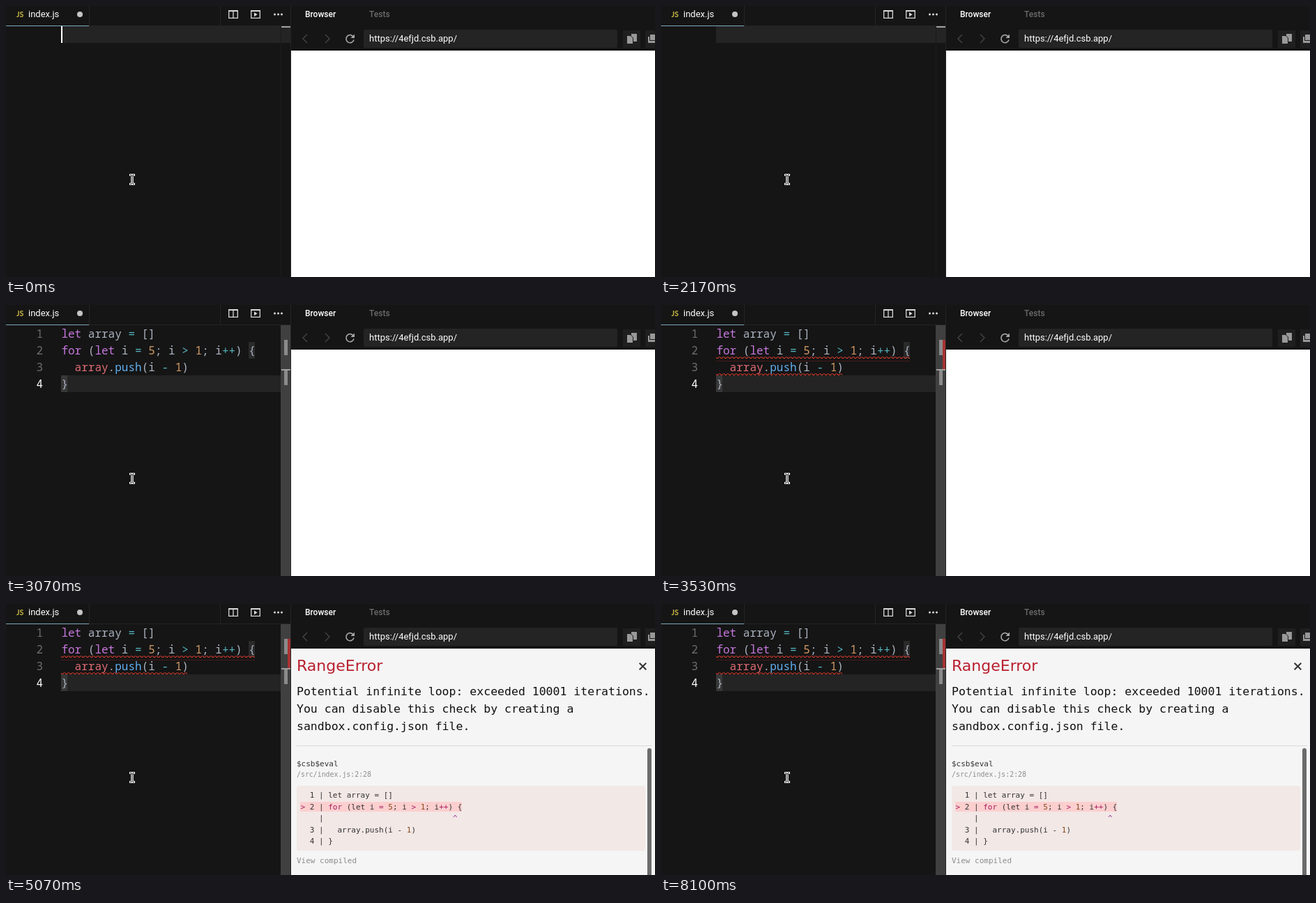
These frames come from a looping animation (931 px wide and 389 px high, 8230 ms). An HTML page:

```html
<!DOCTYPE html>
<html lang="en">
<head>
<meta charset="utf-8">
<title>Infinite loop check</title>
<style>
html, body { margin: 0; width: 100%; height: 100%; overflow: hidden; background: #151515; }
svg { display: block; }
text { white-space: pre; font-family: Roboto, sans-serif; }
.code text { font: 16px "Noto Sans Mono", monospace; fill: #abb2bf; }
.code .kw { fill: #c678dd; }
.code .op { fill: #56b6c2; }
.code .num { fill: #d19a66; }
.code .name { fill: #e06c75; }
.code .fn { fill: #61afef; }
.code .line { fill: #6d6d6d; }
.code .active { fill: #fff; }
.report text { font: 11px "DejaVu Sans Mono", monospace; fill: #333; }
.report .title { font: 22px "DejaVu Sans", sans-serif; fill: #b9202f; }
.report .message { font-size: 16.5px; fill: #111; }
.report .path { font-size: 9.9px; fill: #8c8c8c; }
.report .link { fill: #8c8c8c; }
.report .mark { fill: #a71d5d; }
.report .caret { fill: #a0309a; }
.report .num { fill: #8a4b1c; }
</style>
</head>
<body>
<svg width="931" height="389" viewBox="0 0 931 389">
  <defs>
    <pattern id="wave" width="6" height="3" patternUnits="userSpaceOnUse" patternTransform="translate(79 74)">
      <path fill="#e03a2c" d="M5.5 0 2.5 3H1.1L4.1 0zM4 0 6 2V.6L5.4 0zM0 2 1 3H2.4L0 .6z"/>
    </pattern>
  </defs>
  <rect width="931" height="389" fill="#151515"/>

  <!-- Editor -->
  <rect id="current" x="79" y="29" width="329" height="24" fill="#242424"/>
  <g id="code" class="code">
    <path d="M348 53h9v24h-9zM79 101h9v24h-9z" fill="#fff" fill-opacity=".09"/>
  </g>
  <g id="errors">
    <rect x="79" y="74" width="278" height="3" fill="url(#wave)"/>
    <rect x="79" y="98" width="181" height="3" fill="url(#wave)"/>
    <rect x="79" y="80" width="278" height="1" fill="#8a2620" opacity=".4"/>
  </g>
  <rect x="394" y="29" width="1" height="360" fill="#1b1b1b"/>
  <rect id="slider" x="394" y="29" width="14" height="360" fill="#404040"/>
  <path id="brackets" d="M399 50h5v22h-5zM399 93h5v22h-5z" fill="#8b8b8b"/>
  <rect id="ruler" x="404" y="50" width="4" height="42" fill="#a83232"/>
  <rect id="position" x="395" y="29" width="13" height="2" fill="#a0a0a0"/>
  <rect id="caret" x="79" y="29" width="2" height="24" fill="#fff"/>

  <!-- Tabs -->
  <path d="M119.5 0v28M307.5 0v28M119 28.5h289" stroke="#242424" fill="none"/>
  <rect y="28" width="119" height="1" fill="#7fa9bd"/>
  <text x="15" y="16" font-size="10.5" font-weight="700" fill="#cbb945" style="font-family:Lato,sans-serif">JS</text>
  <text x="32" y="16" font-size="13" fill="#fff">index.js</text>
  <circle cx="106" cy="12" r="4" fill="#c5c5c5"/>
  <g fill="none" stroke="#d8d8d8" stroke-width="1.3">
    <path d="M319.7 6.7h12.6v10.6h-12.6zM326 7v10M319 7.4h14"/>
    <path d="M351.7 6.7h12.6v10.6h-12.6zM351 7.4h14"/>
  </g>
  <path d="M356 9.3v6l4.6-3z" fill="#d8d8d8"/>
  <g fill="#d8d8d8"><circle cx="385.5" cy="12" r="1.5"/><circle cx="390.5" cy="12" r="1.5"/><circle cx="395.5" cy="12" r="1.5"/></g>

  <!-- Browser -->
  <rect x="408" width="1" height="389" fill="#242424"/>
  <g font-size="12" font-weight="500">
    <text x="429" y="16" fill="#fff">Browser</text>
    <text x="521" y="16" fill="#6b6b6b">Tests</text>
  </g>
  <g fill="none" stroke-width="1.4">
    <path d="M432 41l-6 6 6 6M458 41l6 6-6 6" stroke="#444"/>
    <path d="M498.3 44.2a5.6 5.6 0 1 0 .7 4.3" stroke="#a8a8a8" stroke-width="1.6"/>
  </g>
  <path d="M500 40.5v5.5h-5.5z" fill="#a8a8a8"/>
  <rect x="513" y="34" width="364" height="26" rx="2" fill="#242424"/>
  <text x="521" y="51" font-size="13" fill="#fff">https://4efjd.csb.app/</text>
  <path d="M885 35h25v25h-25zM917 35h14v25h-14z" fill="#1f1f1f"/>
  <path d="M897 40h8v11h-8zM891 43h6l2 2v9h-8z" fill="#999"/>
  <path d="M896.5 40v3l3 3v5.5h5" fill="none" stroke="#1f1f1f"/>
  <path d="M924 41h7v8h-7zM921 44h2v6h8v3h-10z" fill="#999"/>
  <rect x="409" y="64" width="522" height="325" fill="#fff"/>

  <!-- Error report -->
  <g id="report" class="report">
    <rect x="409" y="64" width="522" height="325" fill="#f5f5f5"/>
    <path d="M908.7 84.7l9.6 9.6m0-9.6l-9.6 9.6" stroke="#333" stroke-width="2"/>
    <path d="M417 203.5h510" stroke="#dadada"/>
    <rect x="417" y="261" width="500" height="93" rx="4" fill="#f2e8e6"/>
    <rect x="422" y="284" width="232" height="14" fill="#fccfcf"/>
    <rect x="920" y="207" width="6" height="190" rx="3" fill="#6b6b6b"/>
  </g>

  <!-- Pointer -->
  <g fill="none" stroke-linecap="square">
    <path id="beam" d="M178.5 242.5h1.5l1 1 1-1h1.5M181 243.5v10.5M178.5 255.5h1.5l1-1 1 1h1.5" stroke="#fff" stroke-width="3"/>
    <use href="#beam" style="stroke:#000"/>
    <path d="M178.5 242.5h1.5l1 1 1-1h1.5M181 243.5v10.5M178.5 255.5h1.5l1-1 1 1h1.5" stroke="#111" stroke-width="1"/>
  </g>
</svg>
<script>
const NS = "http://www.w3.org/2000/svg";
const $ = id => document.getElementById(id);

function add(parent, tag, attrs, content = "") {
  const node = document.createElementNS(NS, tag);
  for (const key in attrs) node.setAttribute(key, attrs[key]);
  node.textContent = content;
  return parent.appendChild(node);
}

// Markup such as "{kw|let} array" colours the marked part.
function write(parent, x, y, markup, cls = "") {
  const text = add(parent, "text", { x, y, class: cls });
  for (const part of markup.split(/(\{\w+\|[^}]*\})/)) {
    const match = part.match(/^\{(\w+)\|(.*)\}$/);
    if (match) add(text, "tspan", { class: match[1] }, match[2]);
    else if (part) add(text, "tspan", {}, part);
  }
}

const source = [
  "{kw|let} array {op|=} []",
  "{kw|for} ({kw|let} i {op|=} {num|5}; i {op|>} {num|1}; i{op|++}) {",
  "  {name|array}.{fn|push}(i {op|-} {num|1})",
  "}"
];
source.forEach((line, i) => {
  const y = 47 + 24 * i;
  write($("code"), 43.4, y, String(i + 1), i === 3 ? "active" : "line");
  write($("code"), 79.4, y, line);
});

const report = [
  [417, 96, "RangeError", "title"],
  [417, 131, "Potential infinite loop: exceeded 10001 iterations.", "message"],
  [417, 156, "You can disable this check by creating a", "message"],
  [417, 181, "sandbox.config.json file.", "message"],
  [417, 233, "$csb$eval"],
  [417, 248, "/src/index.js:2:28", "path"],
  [422.5, 278, "  1 | let array = []"],
  [422.5, 295, "{mark|>} 2 | {mark|for} (let i {mark|=} {num|5}; i {mark|>} {num|1}; i{mark|++}) {"],
  [422.5, 311, "    |" + " ".repeat(28) + "{caret|^}"],
  [422.5, 328, "  3 |   array.push(i - {num|1})"],
  [422.5, 344, "  4 | }"],
  [417, 372, "View compiled", "link"]
];
report.forEach(row => write($("report"), ...row));

const LOOP = 8230, PASTE = 2570, LINT = 3530, FAIL = 3600;
const blinks = [170, 630, 1170, 1670, 2170, PASTE, 3070, FAIL,
  4100, 4570, 5070, 5570, 6070, 6600, 7070, 8000, 8100];
const fade = [[0, 0], [2630, .1], [2670, .25], [2700, .65], [2730, 1]];

const show = (id, on) => $(id).style.visibility = on ? "visible" : "hidden";
const move = (id, x, y) => $(id).setAttribute("transform", `translate(${x} ${y})`);

function draw(now) {
  const t = now % LOOP;
  const pasted = t >= PASTE;
  show("code", pasted);
  show("brackets", pasted);
  show("errors", t >= LINT);
  show("ruler", t >= LINT);
  show("report", t >= FAIL);
  show("caret", blinks.filter(b => b <= t).length % 2 === 0);
  move("current", 0, pasted ? 72 : 0);
  move("caret", pasted ? 9 : 0, pasted ? 72 : 0);
  move("position", 0, pasted ? 63 : 0);
  $("slider").style.opacity = fade.filter(step => step[0] <= t).pop()[1];
}

const start = performance.now();
function tick() {
  draw(performance.now() - start);
  requestAnimationFrame(tick);
}
draw(0);
requestAnimationFrame(tick);
</script>
</body>
</html>
```
